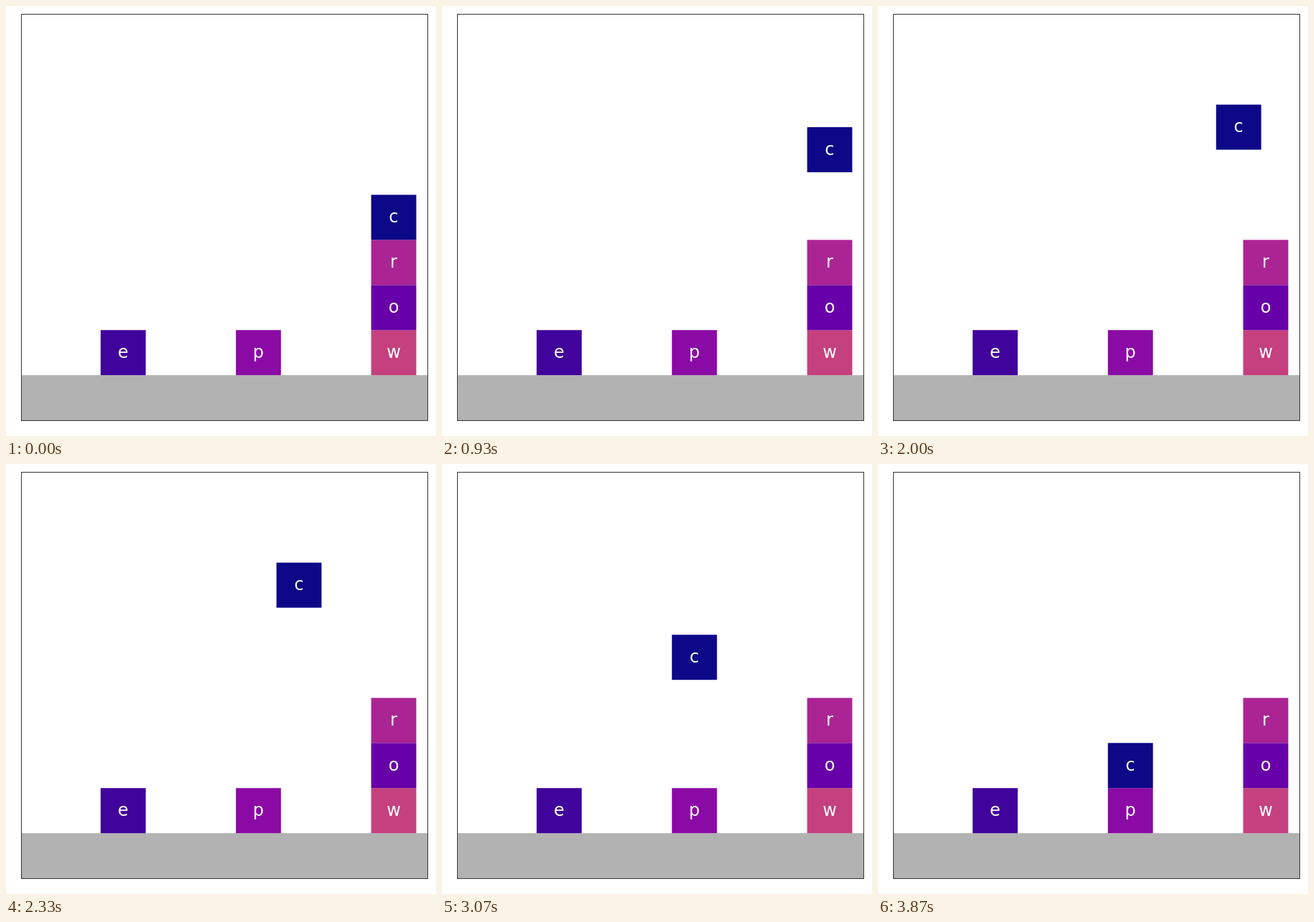
These frames come from a looping animation (600 px wide and 600 px high, 4870 ms). An HTML page:

```html
<!DOCTYPE html>
<html lang="en">
<head>
<meta charset="utf-8">
<title>Block stacking</title>
<style>
  html, body { margin: 0; width: 100%; height: 100%; overflow: hidden; background: #fff; }
  svg { display: block; width: 100vw; height: 100vh; }
  text { font: 24px "DejaVu Sans", sans-serif; fill: #fff; text-anchor: middle; }
</style>
</head>
<body>
<svg id="stage" viewBox="0 0 600 600"></svg>
<script>
const LOOP = 4870;
const UNIT = 62.92;           // side of one block
const LEFT = 21.9, FLOOR = 515.13;
const stage = document.getElementById("stage");

function add(parent, tag, attrs, text = "") {
  const el = document.createElementNS("http://www.w3.org/2000/svg", tag);
  for (const name in attrs) el.setAttribute(name, attrs[name]);
  el.textContent = text;
  return parent.appendChild(el);
}

function addBlock(letter, fill) {
  const g = add(stage, "g", {});
  add(g, "rect", { width: UNIT, height: UNIT, fill });
  add(g, "text", { x: UNIT / 2, y: UNIT / 2 + 7.3 }, letter);
  return g;
}

// column and level are counted in blocks
function place(block, column, level) {
  const x = LEFT + (column + 0.75) * UNIT;
  const y = FLOOR - (level + 1) * UNIT;
  block.setAttribute("transform", `translate(${x} ${y})`);
}

const clamp = (v, max) => Math.max(0, Math.min(max, v));

add(stage, "rect", { x: LEFT, y: FLOOR, width: 9 * UNIT, height: UNIT, fill: "#b2b2b2" });
place(addBlock("e", "#40049c"), 1, 0);
place(addBlock("p", "#8b0aa5"), 4, 0);
place(addBlock("w", "#c5407e"), 7, 0);
place(addBlock("o", "#6700a8"), 7, 1);
place(addBlock("r", "#ab2494"), 7, 2);
const mover = addBlock("c", "#0d0887");
add(stage, "rect", { x: 21.5, y: 11.5, width: 567, height: 567, fill: "none", stroke: "#333" });

// 15 steps per second, with step times rounded to 10 ms
function stepAt(t) {
  const rest = t % 200;
  return Math.floor(t / 200) * 3 + (rest >= 70) + (rest >= 130);
}

function draw(t) {
  const step = stepAt(t);
  const rise = step ? clamp(step + 1, 20) / 10 : 0;
  const slide = step < 30 ? 0 : clamp(step - 28, 10) * 0.3;
  const drop = clamp(step - 38, 20) / 5;
  place(mover, 7 - slide, 3 + rise - drop);
}

const start = performance.now();
function tick() {
  draw((performance.now() - start) % LOOP);
  requestAnimationFrame(tick);
}
tick();
</script>
</body>
</html>
```
